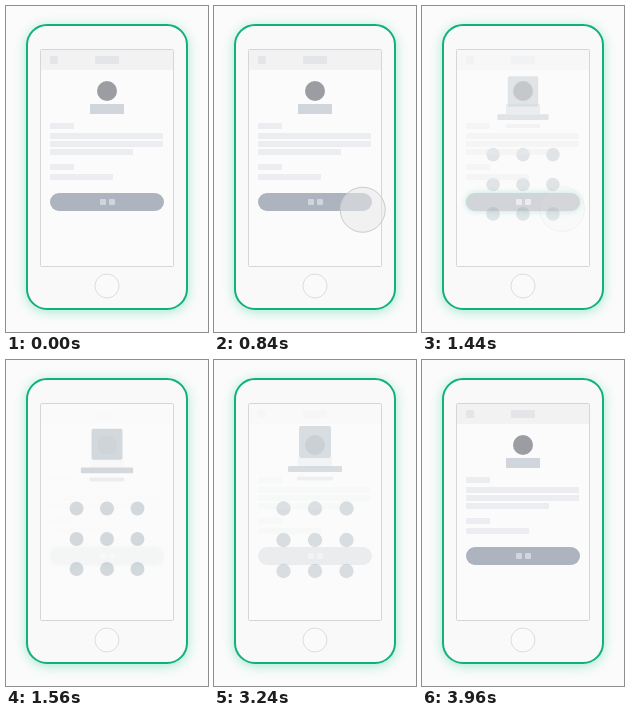
Write an HTML page that moves like this. It is 202x326 px and loops after 4080 ms.

```html
<!DOCTYPE html>
<html lang="en">
<head>
<meta charset="utf-8">
<title>Phone login</title>
<style>
html, body { margin: 0; width: 100%; height: 100%; overflow: hidden; background: #fbfbfb; }
svg { display: block; width: 202px; height: 326px; }
.phone { fill: #f9f9f9; stroke: #12b07a; stroke-width: 2; filter: drop-shadow(0 2px 6px rgba(30, 205, 145, .38)); }
.screen { fill: #fbfbfb; stroke: #d5d6d8; }
.home { fill: #fafafa; stroke: #dddce0; }
.line { fill: #ecedf0; }
.chip { fill: #e3e5e8; }
.solid { fill: #d0d6db; }
.button { fill: #adb4bf; }
#pressed { fill: #929aa4; filter: drop-shadow(0 0 3px rgba(30, 190, 145, .75)); }
.cursor { fill: rgba(233, 234, 234, .55); stroke: #c9cacb; }
</style>
</head>
<body>
<svg viewBox="0 0 202 326">
  <rect class="phone" x="21" y="19" width="160" height="284" rx="20"/>
  <rect class="screen" x="34.5" y="43.5" width="133" height="217" rx="1"/>
  <circle class="home" cx="101" cy="280" r="12"/>

  <g id="pad">
    <rect class="solid" x="85" y="66" width="32" height="32" rx="2"/>
    <rect class="solid" x="74" y="106" width="54" height="6" rx="1"/>
    <rect class="line" x="83" y="116.5" width="36" height="4" rx="1"/>
    <g id="dots" class="solid"></g>
  </g>

  <g id="form">
    <rect x="35" y="44" width="132" height="20" fill="#f2f2f3"/>
    <rect class="chip" x="44" y="50" width="8" height="8" rx="1"/>
    <rect class="chip" x="89" y="50" width="24" height="8" rx="1"/>
    <circle cx="101" cy="85" r="10" fill="#9c9da2"/>
    <rect class="solid" x="84" y="98" width="34" height="10"/>
    <g id="lines" class="line"></g>
    <rect class="button" x="44" y="187" width="114" height="18" rx="9"/>
    <rect id="pressed" x="44" y="187" width="114" height="18" rx="9"/>
    <rect class="solid" x="94" y="193" width="6" height="6" rx="1"/>
    <rect class="solid" x="103" y="193" width="6" height="6" rx="1"/>
  </g>

  <circle id="cursor" class="cursor" r="22.5"/>
</svg>
<script>
const LOOP = 4080, STEP = 120;
const $ = id => document.getElementById(id);

function add(parent, tag, attrs) {
  const el = document.createElementNS('http://www.w3.org/2000/svg', tag);
  for (const key in attrs) el.setAttribute(key, attrs[key]);
  parent.append(el);
}

for (const cy of [148.5, 180, 211])
  for (const cx of [69.5, 101, 132.5]) add($('dots'), 'circle', { cx, cy, r: 7.2 });

for (const [y, width] of [[117, 24], [127, 113], [135, 113], [143, 83], [158, 24], [168, 63]])
  add($('lines'), 'rect', { x: 44, y, width, height: 6, rx: 1 });

const ramp = (t, from, to) => Math.min(1, Math.max(0, (t - from) / (to - from)));
const smooth = p => p * p * (3 - 2 * p);
const easeOut = p => 1 - (1 - p) ** 2;
const mix = (a, b, p) => a + (b - a) * p;

function draw(t) {
  const toPad = smooth(ramp(t, 1200, 1620));
  const toForm = ramp(t, 3120, 3720);
  const padShown = toPad * (1 - toForm);
  const scale = mix(.9, 1, easeOut(ramp(t, 1200, 2040)));

  $('form').setAttribute('opacity', 1 - toPad + toForm);
  $('pad').setAttribute('opacity', padShown);
  $('pad').setAttribute('transform', `translate(101 150) scale(${scale}) translate(-101 -150)`);
  $('pressed').setAttribute('opacity', t < 2400 ? ramp(t, 900, 1200) : 0);

  const move = smooth(ramp(t, 240, 960));
  $('cursor').setAttribute('cx', mix(258, 140, move));
  $('cursor').setAttribute('cy', mix(213, 203, move));
  $('cursor').setAttribute('opacity', 1 - ramp(t, 1200, 1500));
}

const start = performance.now();
function tick() {
  const t = (performance.now() - start) % LOOP;
  draw(Math.floor(t / STEP) * STEP);
  requestAnimationFrame(tick);
}
tick();
</script>
</body>
</html>
```
